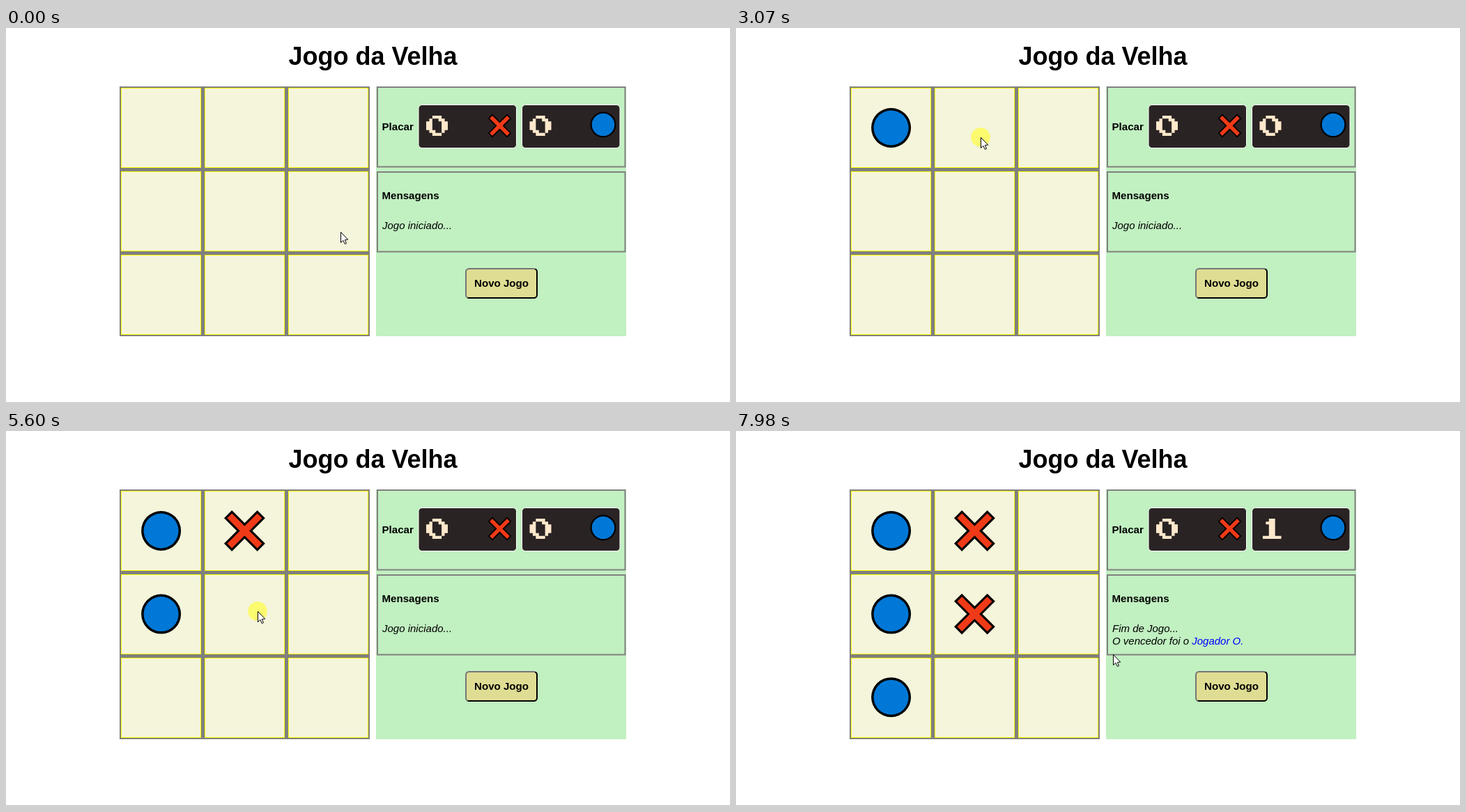
An HTML page with a canvas for the animation above (8000 ms loop, 1039 px wide and 539 px high).

```html
<!DOCTYPE html>
<html lang="pt">
<head>
<meta charset="utf-8">
<title>Jogo da Velha</title>
<style>
html, body { margin: 0; width: 100%; height: 100%; overflow: hidden; background: #fff; }
canvas { display: block; }
</style>
</head>
<body>
<canvas id="stage" width="1039" height="539"></canvas>
<script>
const ctx = document.getElementById('stage').getContext('2d');
const LOOP = 8000;
const TICK = 78;
const BOARD = { x: 163, y: 84, size: 359, pitch: 120, cell: 115 };
const PANEL = { x: 531, y: 84, size: 359 };
const GRAY = '#808080';
const SANS = '"Liberation Sans", Arial, sans-serif';

// Each glide bends down by `sag` and slows with power `ease`
const START = { x: 480, y: 293 };
const GLIDES = [
  { from: 70, until: 200, x: 460, y: 266, sag: 38 },
  { from: 750, until: 750, x: 459, y: 262 },
  { from: 1130, until: 1670, x: 240, y: 145, sag: -22, ease: 2.4 },
  { from: 2460, until: 2840, x: 351, y: 157, sag: 56 },
  { from: 3780, until: 4130, x: 227, y: 263 },
  { from: 4990, until: 5140, x: 371, y: 259, sag: 36 },
  { from: 5370, until: 5520, x: 361, y: 259 },
  { from: 6150, until: 6600, x: 222, y: 376, sag: 19 },
  { from: 7460, until: 7980, x: 541, y: 321, sag: 37 }
];

// Players alternate, filling the two left columns row by row
const CLICKS = [
  { down: 1750, up: 1830 },
  { down: 3070, up: 3150 },
  { down: 4280, up: 4420 },
  { down: 5600, up: 5680 },
  { down: 6770, up: 6830 }
];
const GAME_OVER = CLICKS[CLICKS.length - 1].up;

function rect(x, y, w, h, color) {
  ctx.fillStyle = color;
  ctx.fillRect(x, y, w, h);
}

function frame(x, y, w, h, color, line) {
  ctx.strokeStyle = color;
  ctx.lineWidth = line;
  ctx.strokeRect(x + line / 2, y + line / 2, w - line, h - line);
}

function roundBox(x, y, w, h, r, fill, edge, line) {
  ctx.beginPath();
  ctx.roundRect(x, y, w, h, r);
  ctx.fillStyle = fill;
  ctx.fill();
  ctx.strokeStyle = edge;
  ctx.lineWidth = line;
  ctx.stroke();
}

function disc(x, y, r, color) {
  ctx.fillStyle = color;
  ctx.beginPath();
  ctx.arc(x, y, r, 0, Math.PI * 2);
  ctx.fill();
}

function text(str, x, y, font, color = '#000', align = 'left') {
  ctx.font = `${font} ${SANS}`;
  ctx.textAlign = align;
  ctx.fillStyle = color;
  ctx.fillText(str, x, y);
  return ctx.measureText(str).width;
}

const label = (str, x, y, align) => text(str, x, y, 'bold 15.1px', '#000', align);
const note = (str, x, y, color) => text(str, x, y, 'italic 15px', color);

function drawO(x, y, scale = 1) {
  disc(x, y, 28.5 * scale, '#000');
  disc(x, y, 25 * scale, '#0078d7');
}

function plus(half, reach, color) {
  ctx.fillStyle = color;
  ctx.beginPath();
  ctx.rect(-reach, -half, reach * 2, half * 2);
  ctx.rect(-half, -reach, half * 2, reach * 2);
  ctx.fill();
}

function drawX(x, y, scale = 1) {
  ctx.save();
  ctx.translate(x, y);
  ctx.scale(scale, scale);
  ctx.rotate(Math.PI / 4);
  plus(7.9, 33.7, '#000');
  plus(4.8, 30.5, '#f03a17');
  ctx.restore();
}

// Blocky digits on a 7 by 7 grid
function drawDigit(n, x, y) {
  ctx.save();
  ctx.translate(x, y);
  ctx.scale(31 / 7, 29 / 7);
  ctx.fillStyle = '#ffe8cb';
  ctx.beginPath();
  if (n === 0) {
    const pair = (cx, cy, w, h) => {
      ctx.rect(cx, cy, w, h);
      ctx.rect(7 - cx - w, 7 - cy - h, w, h);
    };
    pair(2, 0, 3, 1);
    pair(1, 1, 1, 1);
    pair(4, 1, 2, 1);
    pair(0, 2, 2, 3);
  } else {
    ctx.rect(3, 0, 2, 6);
    ctx.rect(2, 1, 1, 1);
    ctx.rect(1, 6, 6, 1);
  }
  ctx.fill();
  ctx.restore();
}

function drawCard(x, score, mark, markX, markY, scale) {
  roundBox(x + 0.5, 110.5, 140.5, 62, 5, '#2a2323', '#fff', 1);
  drawDigit(score, x + 11.5, 126);
  mark(markX, markY, scale);
}

function drawBoard() {
  const { x, y, size, pitch, cell } = BOARD;
  rect(x, y, size, size, GRAY);
  for (let i = 0; i < 9; i++) {
    const cx = x + 2 + i % 3 * pitch, cy = y + 2 + Math.floor(i / 3) * pitch;
    rect(cx, cy, cell, cell, '#f5f5dc');
    frame(cx, cy, cell, cell, '#ff0', 1);
  }
}

function drawButton() {
  const edge = ctx.createLinearGradient(689, 315, 733, 419);
  edge.addColorStop(0.5, '#767676');
  edge.addColorStop(0.5, '#000');
  roundBox(660, 346, 102, 42, 4.5, '#dfdd93', edge, 2);
  label('Novo Jogo', 711, 372, 'center');
}

function drawPanel(over) {
  const { x, y, size } = PANEL;
  rect(x, y, size, size, '#c1f0c1');
  for (const top of [y, y + 122]) frame(x + 1, top, size - 1.5, 116.5, GRAY, 2);

  label('Placar', 539.5, 147);
  drawCard(591.5, 0, drawX, 708.5, 140.5, 0.58);
  drawCard(740, over ? 1 : 0, drawO, 857, 139, 0.65);

  label('Mensagens', 539.5, 246);
  if (over) {
    note('Fim de Jogo...', 540, 289);
    const w = note('O vencedor foi o ', 540, 307);
    note('Jogador O.', 540 + w, 307, '#00f');
  } else {
    note('Jogo iniciado...', 540, 289);
  }
  drawButton();
}

function pointerAt(t) {
  let { x, y } = START;
  for (const { from, until, x: toX, y: toY, sag = 0, ease = 1.5 } of GLIDES) {
    if (t < from) break;
    const gaps = Math.round((until - from) / TICK);
    const gap = (until - from) / gaps || 1;
    const step = Math.min(gaps, Math.floor((t - from + 4) / gap)) + 1;
    const s = 1 - Math.pow(1 - step / (gaps + 1), ease);
    x = Math.round(x + (toX - x) * s);
    y = Math.round(y + (toY - y) * s + 2 * s * (1 - s) * sag);
  }
  return { x, y };
}

function drawPointer({ x, y }) {
  ctx.save();
  ctx.translate(x + 0.5, y + 0.5);
  ctx.fillStyle = '#fff';
  ctx.strokeStyle = '#000';
  ctx.lineWidth = 1;
  const arrow = new Path2D('M0 0V15L3.4 11.8L5.8 17L8 16L5.8 11L10.2 10.6Z');
  ctx.fill(arrow);
  ctx.stroke(arrow);
  ctx.restore();
}

function draw(t) {
  rect(0, 0, 1039, 539, '#fff');
  rect(0, 538, 1039, 1, '#c0c0c0');
  text('Jogo da Velha', 526.5, 53, 'bold 36px', '#000', 'center');
  drawBoard();
  drawPanel(t >= GAME_OVER);

  const tip = pointerAt(t);
  CLICKS.forEach(({ down, up }, i) => {
    const mark = i % 2 ? drawX : drawO;
    if (t >= up) mark(222.6 + i % 2 * 119.8, 143.5 + (i >> 1) * 119.6);
    else if (t >= down) disc(tip.x, tip.y, 13.8, '#fcfa6e');
  });
  drawPointer(tip);
}

let begin;
function tick(now) {
  begin ??= now;
  draw((now - begin) % LOOP);
  requestAnimationFrame(tick);
}
draw(0);
requestAnimationFrame(tick);
</script>
</body>
</html>
```
